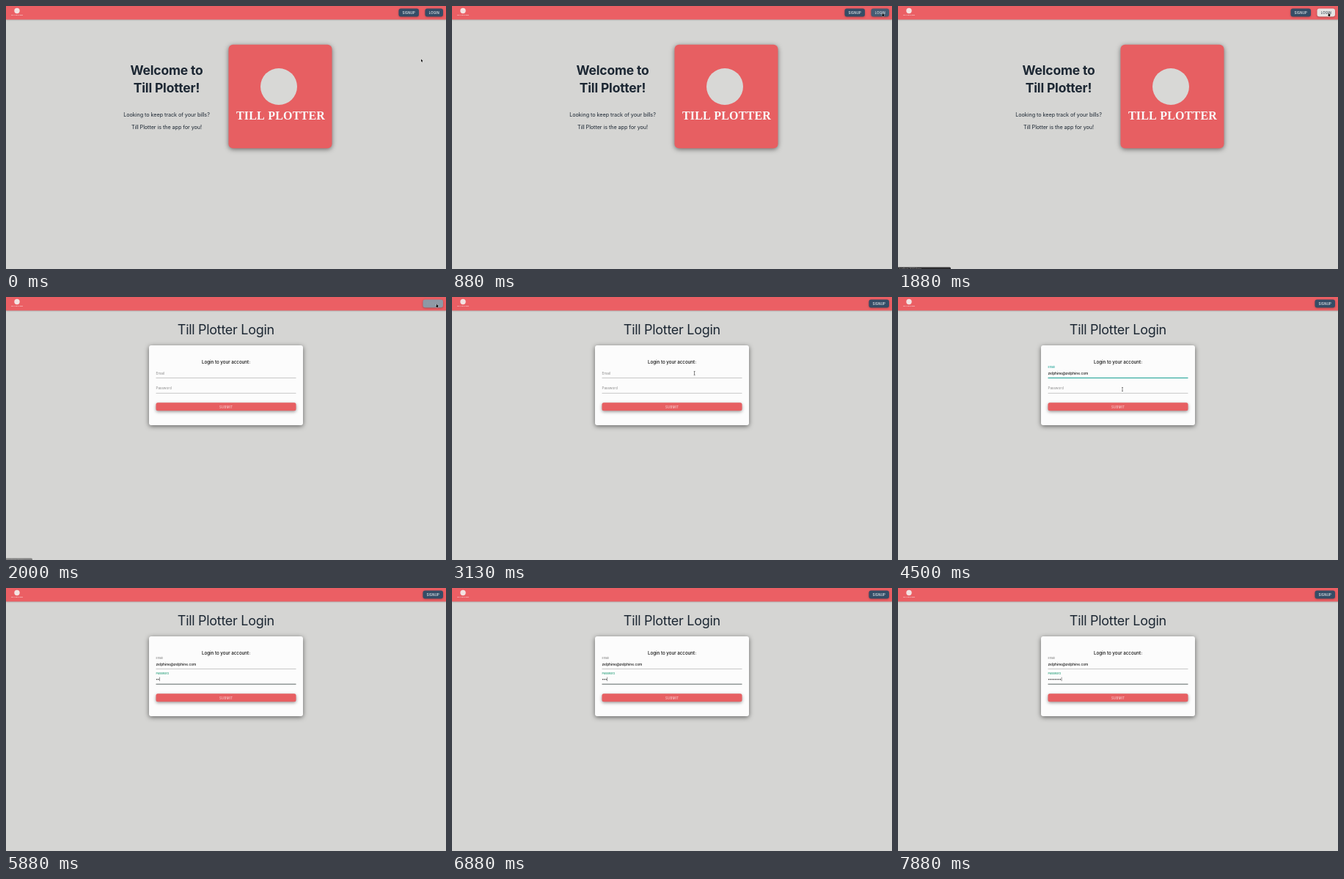
An HTML page with a canvas for the animation above (8 s loop, 600 px wide and 359 px high).

```html
<!DOCTYPE html>
<html lang="en">
<head>
<meta charset="utf-8">
<title>Till Plotter</title>
<style>
html, body { margin: 0; width: 100%; height: 100%; overflow: hidden; background: #d5d5d3; }
canvas { display: block; width: 600px; height: 359px; }
</style>
</head>
<body>
<canvas id="stage"></canvas>
<script>
const W = 600, H = 359, LOOP = 8000, STEP = 125;
const canvas = document.getElementById('stage');
const ctx = canvas.getContext('2d');
const dpr = window.devicePixelRatio || 1;
canvas.width = Math.round(W * dpr);
canvas.height = Math.round(H * dpr);

const SANS = 'Inter, "Open Sans", sans-serif';
const SERIF = '"Liberation Serif", "Noto Serif", serif';
const RED = '#e75f62', INK = '#1c2733', TEAL = '#26a69a', GREY = '#8c8c8c';
const NAVY = [52, 77, 102], PALE = [229, 229, 228], WHITE = [244, 246, 248], DARK = [52, 66, 80];

const PAGE_CHANGE = 2000;
const EMAIL_FOCUS = 3375, EMAIL_FILL = 3875, PASS_FOCUS = 4750;
const KEYS = [5500, 5750, 6750, 7000, 7250, 7500, 7625, 7750];

// Pointer stops: time, x, y
const PATH = [
  [125, 566, 72.5], [900, 587, 9.5], [2125, 587, 9.5],
  [3000, 330.7, 104], [4125, 330.7, 104], [4500, 306, 126]
];

const clamp = v => Math.max(0, Math.min(1, v));
const ramp = (t, from, to) => clamp((t - from) / (to - from));
const ease = v => v * v * (3 - 2 * v);
const lerp = (a, b, k) => a + (b - a) * k;
const mix = (a, b, k) => `rgb(${a.map((v, i) => Math.round(lerp(v, b[i], k))).join(',')})`;

function text(str, x, y, size, color, { weight = 400, align = 'left', space = 0, family = SANS } = {}) {
  ctx.font = `${weight} ${size}px ${family}`;
  ctx.letterSpacing = space + 'px';
  ctx.textAlign = align;
  ctx.fillStyle = color;
  ctx.fillText(str, x, y);
}

function box(x, y, w, h, r, color, shadow) {
  ctx.save();
  if (shadow) {
    ctx.shadowColor = `rgba(0,0,0,${shadow.alpha})`;
    ctx.shadowBlur = shadow.blur * dpr;
    ctx.shadowOffsetY = shadow.drop * dpr;
  }
  ctx.fillStyle = color;
  ctx.beginPath();
  ctx.roundRect(x, y, w, h, r);
  ctx.fill();
  ctx.restore();
}

function disc(x, y, r, color) {
  ctx.fillStyle = color;
  ctx.beginPath();
  ctx.arc(x, y, r, 0, 2 * Math.PI);
  ctx.fill();
}

function line(y, color, thick) {
  ctx.fillStyle = color;
  ctx.fillRect(204.5, y - thick / 2, 191, thick);
}

function navButton(label, x, w, hover) {
  box(x, 3.5, w, 11, 3, mix(NAVY, PALE, hover), { alpha: 0.3, blur: 2.5, drop: 0.8 });
  text(label, x + w / 2, 10.7, 4.3, mix(WHITE, DARK, hover),
    { weight: 500, align: 'center', space: 0.2 });
}

function header() {
  box(0, 0, W, 18.5, 0, '#eb5f64', { alpha: 0.25, blur: 2, drop: 0.6 });
  disc(15, 6.5, 3.7, '#f3e3e2');
  text('TILL PLOTTER', 15, 13, 2.2, '#fbeeee', { weight: 700, align: 'center', family: SERIF });
}

function welcomePage(t) {
  const bold = { weight: 700, align: 'center', space: -0.18 };
  text('Welcome to', 219, 93.6, 17.5, INK, bold);
  text('Till Plotter!', 219, 117.5, 17.5, INK, bold);
  const plain = { align: 'center', space: -0.06 };
  text('Looking to keep track of your bills?', 219, 151, 7.25, INK, plain);
  text('Till Plotter is the app for you!', 219, 168, 7.25, INK, plain);

  box(303.5, 52.8, 141, 141.4, 6, RED, { alpha: 0.5, blur: 6, drop: 1.5 });
  disc(372, 110, 25, '#d8d8d6');
  text('TILL PLOTTER', 374.5, 154.6, 16, '#fafafa',
    { weight: 700, align: 'center', space: 0.2, family: SERIF });

  navButton('SIGNUP', 535.5, 27.5, 0);
  navButton('LOGIN', 571.5, 24.5, ramp(t, 850, 1100));
}

function field(label, y, lift, labelColor) {
  text(label, 204.5, lerp(y, y - 8.9, lift), lerp(4.6, 3.7, lift), labelColor,
    { weight: lift > 0.5 ? 500 : 400 });
}

function loginPage(t) {
  text('Till Plotter Login', 299.8, 50.7, 18, INK, { align: 'center', space: -0.3 });
  box(195, 66, 210, 109, 3, '#fcfcfc', { alpha: 0.55, blur: 6, drop: 1.5 });
  text('Login to your account:', 300, 90.5, 6.25, '#111', { weight: 500, align: 'center', space: -0.04 });

  const onPass = t >= PASS_FOCUS, onEmail = t >= EMAIL_FOCUS && !onPass;
  const emailLift = ease(ramp(t, EMAIL_FOCUS, EMAIL_FOCUS + 250));
  const passLift = ease(ramp(t, PASS_FOCUS, PASS_FOCUS + 250));
  field('Email', 105.6, emailLift, onEmail ? TEAL : GREY);
  field('Password', 126.4, passLift, onPass ? '#2aa07c' : GREY);
  line(110.5, onEmail ? TEAL : '#a6a6a6', onEmail ? 1.1 : 0.6);
  line(131.2, onPass ? '#4c5655' : '#a6a6a6', onPass ? 0.9 : 0.6);

  if (t >= EMAIL_FILL) text('zelphine@zelphine.com', 204.5, 105.5, 4.8, '#161616', { weight: 500 });
  else if (onEmail) caret(204.8, 104);

  const dots = KEYS.filter(k => t >= k).length;
  for (let i = 0; i < dots; i++) disc(205.7 + i * 2.25, 124.8, 0.7, '#161616');
  const blinkOff = t >= 6375 && t < 6500;
  if (onPass && !blinkOff) caret(204.8 + dots * 2.25, 124.4);

  box(204.5, 144.3, 191, 11, 2.5, RED, { alpha: 0.4, blur: 4, drop: 1.4 });
  text('SUBMIT', 300.2, 151.5, 4.2, '#fbe6e6', { align: 'center', space: 0.35 });

  const hover = ramp(t, 1940, 2060) * (1 - ramp(t, 2200, 2400));
  navButton('SIGNUP', 568.5, 27.5, hover);
}

function caret(x, y) {
  ctx.fillStyle = '#333';
  ctx.fillRect(x, y - 2.7, 0.5, 5.4);
}

function statusBar(t) {
  const first = t < PAGE_CHANGE;
  const alpha = first ? ramp(t, 950, 1125) : ramp(t, 1900, 2100) * (1 - ramp(t, 2500, 2750));
  if (!alpha) return;
  ctx.globalAlpha = alpha;
  box(-3, 356.5, first ? 75 : 39, 8, 1.5, '#2c2c2e');
  text(first ? 'localhost:3000/login' : 'localhost:3000', 1, 360.2, 3.2, '#a8a8a8');
  ctx.globalAlpha = 1;
}

function pointerAt(t) {
  if (t <= PATH[0][0]) return PATH[0].slice(1);
  for (let i = 1; i < PATH.length; i++) {
    const [t0, x0, y0] = PATH[i - 1], [t1, x1, y1] = PATH[i];
    if (t <= t1) {
      const k = ease(ramp(t, t0, t1));
      return [lerp(x0, x1, k), lerp(y0, y1, k)];
    }
  }
  return PATH[PATH.length - 1].slice(1);
}

function polygon(points, x, y) {
  ctx.beginPath();
  points.forEach(([px, py]) => ctx.lineTo(x + px, y + py));
  ctx.closePath();
  ctx.lineWidth = 0.5;
  ctx.strokeStyle = '#f4f4f4';
  ctx.stroke();
  ctx.fillStyle = '#111';
  ctx.fill();
}

const ARROW = [[0, 0], [0, 3.6], [0.8, 2.9], [1.4, 4.2], [2, 3.9], [1.5, 2.7], [2.6, 2.6]];
const HAND = [[0, 0], [0.7, 0], [0.9, 1.4], [2.4, 1.8], [2.3, 3.5], [1.8, 4.4], [0.2, 4.4], [-1, 2.5], [-0.5, 2.2], [0, 2.7]];

function pointer(t) {
  if (t >= KEYS[0]) return;
  const [x, y] = pointerAt(t);
  const overButton = y < 15 && x > 568;
  const overField = x > 204 && x < 396 && y > 98 && y < 132;
  if (overButton) polygon(HAND, x, y);
  else if (overField) {
    ctx.fillStyle = '#333';
    ctx.fillRect(x - 0.3, y - 2.5, 0.6, 5);
    ctx.fillRect(x - 1, y - 2.7, 2, 0.5);
    ctx.fillRect(x - 1, y + 2.2, 2, 0.5);
  } else polygon(ARROW, x, y);
}

function draw(now) {
  const t = Math.floor((now % LOOP) / STEP) * STEP;
  ctx.setTransform(dpr, 0, 0, dpr, 0, 0);
  ctx.fillStyle = '#d5d5d3';
  ctx.fillRect(0, 0, W, H);
  header();
  if (t < PAGE_CHANGE) welcomePage(t);
  else loginPage(t);
  statusBar(t);
  pointer(t);
}

const start = performance.now();
function tick() {
  draw(performance.now() - start);
  requestAnimationFrame(tick);
}
tick();
</script>
</body>
</html>
```
